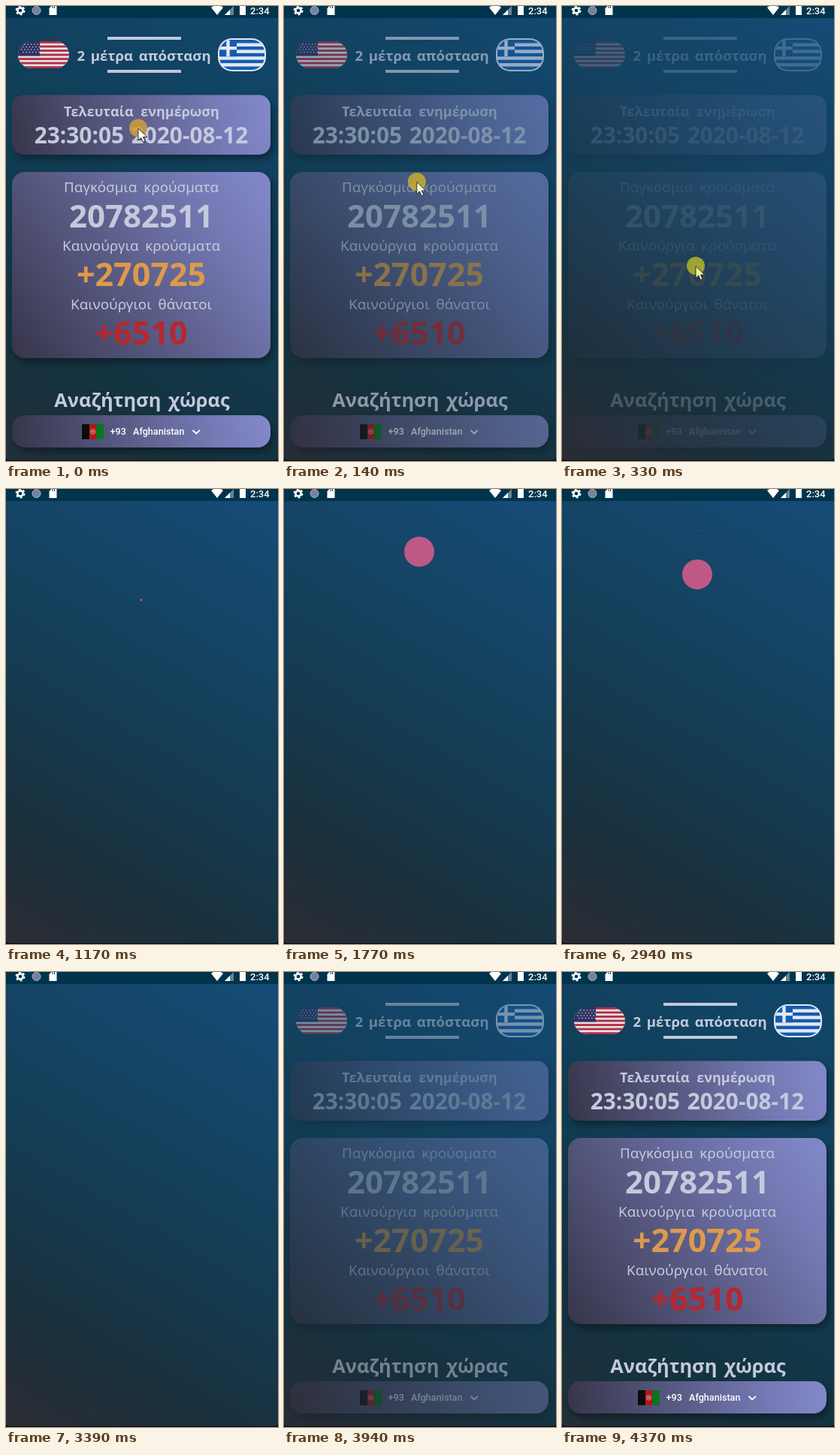
Write an HTML page that moves like this. It is 362x606 px and loops after 5.32 s.

```html
<!DOCTYPE html>
<html lang="el">
<head>
<meta charset="utf-8">
<title>2 μέτρα απόσταση</title>
<style>
  html, body { margin: 0; width: 100%; height: 100%; overflow: hidden; background: #000; }
  svg { display: block; width: 100%; height: 100%; }
  text { font-family: "Noto Sans", "DejaVu Sans", sans-serif; fill: #c4cadc; }
  .mid { text-anchor: middle; }
  .bold { font-weight: 700; }
  .semi { font-weight: 600; }
  .label { font-size: 18.8px; word-spacing: 4px; }
  .ui { font-family: Roboto, sans-serif; font-weight: 500; fill: #fff; }
  .card { filter: drop-shadow(4px 6px 5px rgba(0, 0, 0, .35)); }
</style>
</head>
<body>
<svg viewBox="0 0 362 606">
  <defs>
    <linearGradient id="sky" gradientUnits="userSpaceOnUse" x1="362" y1="0" x2="0" y2="606">
      <stop offset="0" stop-color="#164d7a"/>
      <stop offset=".5" stop-color="#143d55"/>
      <stop offset=".8" stop-color="#1a303c"/>
      <stop offset="1" stop-color="#2c2c34"/>
    </linearGradient>
    <linearGradient id="violet" gradientUnits="userSpaceOnUse" x1="8" y1="198" x2="352" y2="118">
      <stop offset="0" stop-color="#37354a"/>
      <stop offset=".8" stop-color="#777cb8"/>
      <stop offset="1" stop-color="#8388c9"/>
    </linearGradient>
    <linearGradient id="violetTall" href="#violet" x1="8" y1="469" x2="352" y2="221"/>
    <linearGradient id="violetFlat" href="#violet" x1="8" y1="588" x2="352" y2="545"/>
    <clipPath id="pill"><rect x="16" y="47" width="68" height="36" rx="18"/></clipPath>
    <clipPath id="badge"><rect x="284" y="45" width="60" height="40" rx="17"/></clipPath>
  </defs>

  <rect width="362" height="606" fill="url(#sky)"/>

  <g id="cards">
    <rect y="16" width="362" height="590" fill="#06384a" opacity=".25"/>
    <rect class="card" x="8" y="118.5" width="344" height="79.5" rx="15" fill="url(#violet)"/>
    <rect class="card" x="8" y="221" width="344" height="248" rx="17" fill="url(#violetTall)"/>
    <rect class="card" x="8" y="545" width="344" height="43" rx="17" fill="url(#violetFlat)"/>

    <g class="mid">
      <text class="semi" x="180.5" y="147" font-size="18" word-spacing="5">Τελευταία ενημέρωση</text>
      <text class="bold" x="180" y="182.5" font-size="29.8" word-spacing="2">23:30:05 2020-08-12</text>
      <text class="label" x="180" y="248">Παγκόσμια κρούσματα</text>
      <text class="bold" x="180" y="294.5" font-size="42">20782511</text>
      <text class="label" x="180" y="326">Καινούργια κρούσματα</text>
      <text class="bold" x="180" y="372.5" font-size="43" style="fill:#dd9a4b">+270725</text>
      <text class="label" x="180" y="404">Καινούργιοι θάνατοι</text>
      <text class="bold" x="180" y="450.5" font-size="43" style="fill:#b7272f">+6510</text>
    </g>

    <path d="M101 557h10v20h-10z" fill="#0c0c0c"/>
    <path d="M111 557h9v20h-9z" fill="#b01818"/>
    <path d="M120 557h10v20h-10z" fill="#0a7420"/>
    <circle cx="115.5" cy="567" r="3" fill="none" stroke="#e0a8a8"/>
    <path d="M114.5 566h2v2h-2z" fill="#e0a8a8"/>
    <text class="ui" x="138.5" y="571" font-size="12.6">+93</text>
    <text class="ui" x="169" y="571" font-size="12.6">Afghanistan</text>
    <path d="M248.5 565l4.7 4.5 4.7-4.5" fill="none" stroke="#fff" stroke-width="1.8"/>
  </g>

  <g id="header">
    <path d="M135 43h98M135 87h98" stroke="#c0c8da" stroke-width="4"/>
    <text class="semi mid" x="183.5" y="73" font-size="18.6" word-spacing="3">2 μέτρα απόσταση</text>
    <g clip-path="url(#pill)">
      <rect x="16" y="47" width="68" height="36" fill="#e2e0e8"/>
      <g id="stripesRed" fill="#b02c40"></g>
      <rect x="16" y="47" width="29" height="19.4" fill="#2e3362"/>
      <path d="M20 51h25M22 54.5h23M20 58h25M22 61.5h23" stroke="#c5c7da" stroke-width="1.3" stroke-dasharray="1.3 3"/>
    </g>
    <rect x="282" y="43" width="64" height="44" rx="19" fill="#e4e8f2"/>
    <g clip-path="url(#badge)">
      <g id="stripesBlue" fill="#145cb0"></g>
      <rect x="284" y="45" width="23" height="22.2" fill="#145cb0"/>
      <path d="M284 56.1h23M295.5 45v22.2" stroke="#e4e8f2" stroke-width="4.4"/>
    </g>
  </g>

  <text id="title" class="semi mid" x="181" y="533.5" font-size="25.4" word-spacing="3">Αναζήτηση χώρας</text>

  <path id="arc" d="M165 59A29 29 0 0 1 195 59" fill="none" stroke="#2c5a72"/>
  <circle id="ball" cx="180" fill="#be5985"/>

  <path d="M0 601q0 4 5 4h352q5 0 5-4v5H0z" fill="#05070c"/>

  <g id="pointer">
    <circle id="touch" cy="-.5" r="12" opacity=".85"/>
    <path id="arrow" d="M0 0v16l3.7-3.5 2.6 5.8 2.8-1.2-2.6-5.6h5.200z" stroke="#222" stroke-width=".9"/>
  </g>

  <rect width="362" height="16" fill="#00344d"/>
  <g fill="#fff">
    <circle cx="19" cy="6" r="3.6" fill="none" stroke="#fff" stroke-width="2.6"/>
    <circle cx="19" cy="6" r="5.5" fill="none" stroke="#fff" stroke-width="2" stroke-dasharray="2.9 2.86"/>
    <circle cx="40.5" cy="6" r="5.5" fill="#77809c" stroke="#a9b2c2"/>
    <path d="M57.5 12V3l4-4h6v13z"/>
    <path d="M62 0v3M64.5 0v3" stroke="#00344d"/>
    <path d="M273 2q8-6 16 0l-8 10z"/>
    <path d="M291 12L303 0v12z" opacity=".4"/>
    <path d="M291 12l7-7v7z"/>
    <path d="M311 0h8v12h-8z"/>
  </g>
  <text class="ui" x="325" y="10.5" font-size="13">2:34</text>
</svg>

<script>
const LOOP = 5320;
const el = id => document.getElementById(id);
const progress = (t, from, to) => Math.min(1, Math.max(0, (t - from) / (to - from)));
const smooth = p => p * p * (3 - 2 * p);

function addStripes(id, x, y, width, height, count) {
  const step = height / count;
  for (let i = 0; i < count; i += 2) {
    const stripe = document.createElementNS("http://www.w3.org/2000/svg", "rect");
    const box = { x, y: y + i * step, width, height: step };
    for (const key in box) stripe.setAttribute(key, box[key]);
    el(id).append(stripe);
  }
}

function drawContent(t) {
  const alpha = t < 2000
    ? (1 - progress(t, 20, 550)) ** 1.5
    : smooth(progress(t, 3500, 4350));
  el("title").style.opacity = alpha;
  el("header").style.opacity = alpha ** 1.15;
  el("cards").style.opacity = alpha ** 1.4;
}

// The touch mark turns from orange to lime while it is dragged down.
function drawPointer(t) {
  const drag = progress(t, 20, 330);
  const y = 163 + Math.max(0, t - 20) * 0.59;
  el("pointer").setAttribute("transform", `translate(${176 + 2 * drag} ${y})`);
  el("pointer").style.display = t < 730 ? "" : "none";
  el("touch").style.fill = `hsl(${40 + 22 * drag}, 62%, ${52 - 8 * drag}%)`;
  el("arrow").style.fill = `hsl(60, 70%, ${100 - 20 * drag}%)`;
}

// The ball grows while rising, rests, then falls back and shrinks.
function drawBall(t) {
  const rise = t < 2200
    ? 1 - (1 - progress(t, 1170, 1770)) ** 2
    : 1 - progress(t, 2560, 3060) ** 2.8;
  el("ball").setAttribute("cy", 148 - 64.5 * rise);
  el("ball").setAttribute("r", Math.max(1.5, 20 * Math.min(1, rise / 0.45)));
  el("ball").style.display = t >= 1170 && t < 3060 ? "" : "none";
  el("arc").style.opacity = 0.6 * progress(t, 1950, 2350) * (1 - progress(t, 3000, 3200));
}

function frame() {
  const t = performance.now() % LOOP;
  drawContent(t);
  drawPointer(t);
  drawBall(t);
  requestAnimationFrame(frame);
}

addStripes("stripesRed", 16, 47, 68, 36, 13);
addStripes("stripesBlue", 284, 45, 60, 40, 9);
frame();
</script>
</body>
</html>
```
